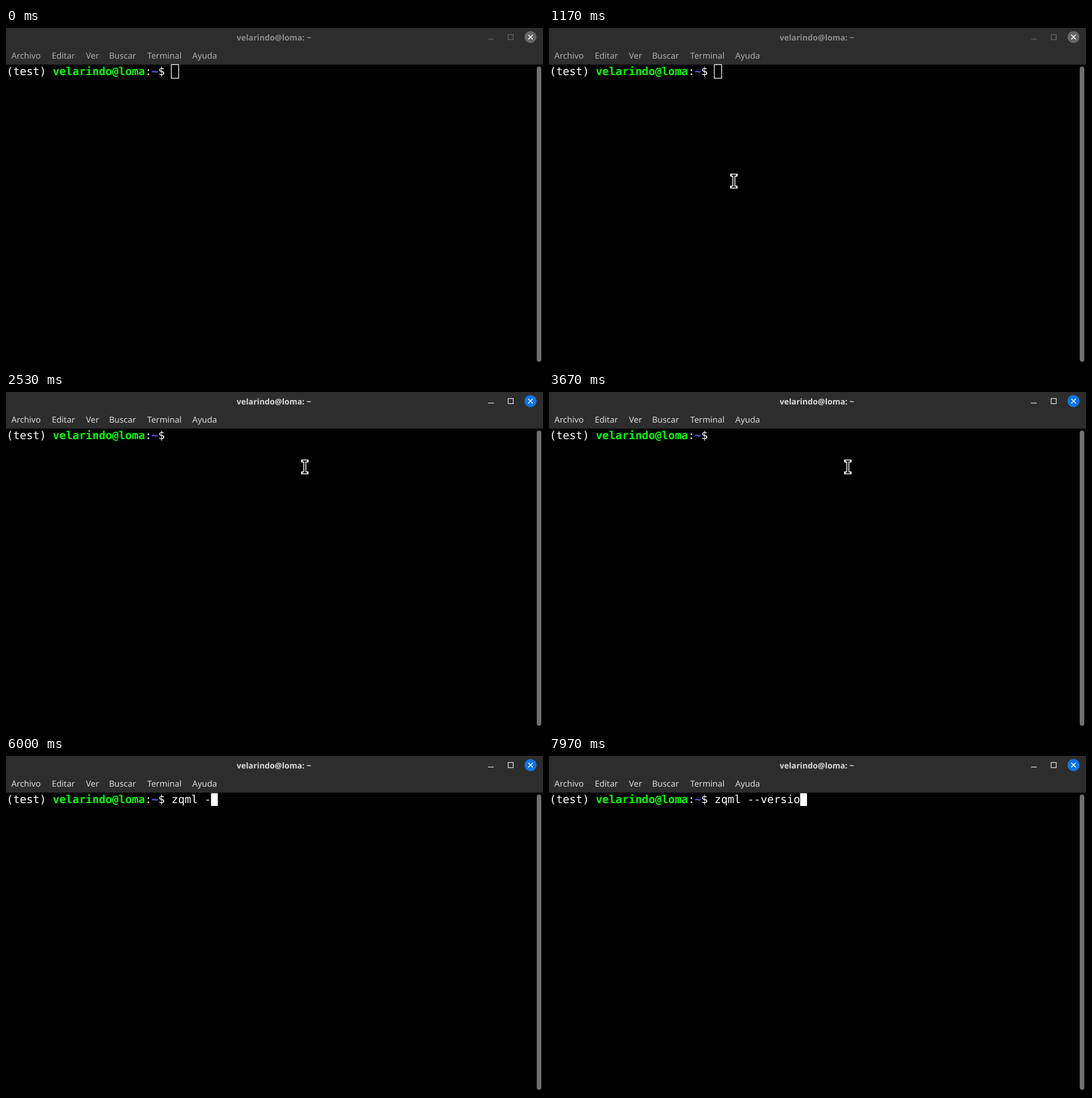
An HTML page that plays this animation: 947x592 px, repeating every 8000 ms.

```html
<!DOCTYPE html>
<html lang="es">
<head>
<meta charset="utf-8">
<title>Terminal</title>
<style>
html, body { margin: 0; width: 100%; height: 100%; overflow: hidden; background: #000; }
svg { display: block; width: 947px; height: 592px; }
text { white-space: pre; text-rendering: geometricPrecision; }
.ui { font: 14.8px "Noto Sans", "Open Sans", sans-serif; fill: #dadada; }
#title { font-size: 14.2px; font-weight: 600; text-anchor: middle; }
.term { font: 19.32px "DejaVu Sans Mono", monospace; fill: #fff; }
.bold { font-weight: bold; }
</style>
</head>
<body>
<svg viewBox="0 0 947 592">
  <rect width="947" height="592"/>
  <rect width="947" height="64.5" fill="#2d2d2d"/>
  <text id="title" class="ui" x="472.5" y="21.5">velarindo@loma: ~</text>
  <g id="buttons" fill="none" stroke="#e4e4e4" stroke-width="1.2">
    <path d="M850 19.5h10"/>
    <rect x="885.5" y="11.5" width="9" height="9"/>
  </g>
  <circle cx="925" cy="16" r="10.5" fill="#666"/>
  <circle id="close" cx="925" cy="16" r="10.5" fill="#0a75ee"/>
  <path d="M921 12l8 8m0-8l-8 8" stroke="#fff" stroke-width="1.5"/>
  <g id="menu" class="ui"></g>
  <rect x="936" y="68" width="8" height="520" rx="4" fill="#707070"/>
  <g id="line" class="term"></g>
  <rect id="hollow" x="291.5" y="64.5" width="13" height="24" fill="none" stroke="#fff" stroke-width="1.3"/>
  <rect id="block" y="65.5" width="12" height="22.5" fill="#fff"/>
  <g id="pointer" fill="none">
    <path d="M-4 -10.5h8M-4 10.5h8M0 -10.5v21" stroke="#fff" stroke-width="5" stroke-linecap="square"/>
    <path d="M-4 -10.5h8M-4 10.5h8M0 -10.5v21" stroke="#000" stroke-width="2"/>
  </g>
</svg>
<script>
const LOOP = 8000, LEFT = 1, CELL = 11.63, PROMPT = 25;
const FOCUS = 1930, FADE = 200;
const BLINK = [2530, 3100, 3670, 4240];
const COMMAND = "zqml --versio";
const KEYS = [4370, 4630, 4830, 5230, 5500, 6000, 6170, 6700, 7100, 7300, 7500, 7700, 7900];
// Pointer waypoints: time, x, y
const PATH = [
  [30, 700, -14], [230, 939, 190], [450, 640, 576], [800, 19, 285],
  [900, 10, 279], [1170, 325, 270], [1400, 470, 185], [1630, 527, 132]
];

const $ = id => document.getElementById(id);
const clamp = v => Math.max(0, Math.min(1, v));
const column = n => LEFT + n * CELL;
const show = (el, on) => el.setAttribute("visibility", on ? "visible" : "hidden");

function addText(parent, x, y, content, fill, bold) {
  const el = document.createElementNS("http://www.w3.org/2000/svg", "text");
  el.setAttribute("x", x);
  el.setAttribute("y", y);
  if (fill) el.setAttribute("fill", fill);
  if (bold) el.setAttribute("class", "bold");
  el.textContent = content;
  return parent.appendChild(el);
}

[["Archivo", 9.5], ["Editar", 80.7], ["Ver", 141], ["Buscar", 181.7], ["Terminal", 249], ["Ayuda", 328.5]]
  .forEach(([label, x]) => addText($("menu"), x, 54, label));

const put = (col, content, fill, bold) => addText($("line"), column(col), 83, content, fill, bold);
put(0, "(test)");
put(7, "velarindo@loma", "#00ff00", true);
put(21, ":");
put(22, "~", "#5c5cff", true);
put(23, "$");
const typed = put(PROMPT, "");

function spline(a, b, c, d, u) {
  return b + u / 2 * (c - a + u * (2 * a - 5 * b + 4 * c - d + u * (3 * (b - c) + d - a)));
}

function pointerAt(t) {
  const last = PATH.length - 1;
  if (t >= PATH[last][0]) return PATH[last].slice(1);
  const i = Math.max(0, PATH.findIndex(p => p[0] > t) - 1);
  const at = n => PATH[Math.max(0, Math.min(last, n))];
  const u = clamp((t - at(i)[0]) / (at(i + 1)[0] - at(i)[0]));
  return [1, 2].map(k => spline(at(i - 1)[k], at(i)[k], at(i + 1)[k], at(i + 2)[k], u));
}

function draw(t) {
  const focus = clamp((t - FOCUS) / FADE);
  $("title").setAttribute("opacity", 0.54 + 0.46 * focus);
  $("menu").setAttribute("opacity", 0.72 + 0.28 * focus);
  $("buttons").setAttribute("opacity", 0.32 + 0.68 * focus);
  $("close").setAttribute("opacity", focus);

  const count = KEYS.filter(k => k <= t).length;
  typed.textContent = COMMAND.slice(0, count);
  const lit = BLINK.filter(b => b <= t).length % 2 === 0;
  show($("hollow"), t < FOCUS);
  show($("block"), t >= FOCUS && lit);
  $("block").setAttribute("x", column(PROMPT + count));

  show($("pointer"), t >= 30 && count === 0);
  $("pointer").setAttribute("transform", `translate(${pointerAt(t)})`);
}

const start = performance.now();
function tick() {
  draw((performance.now() - start) % LOOP);
  requestAnimationFrame(tick);
}
tick();
</script>
</body>
</html>
```
